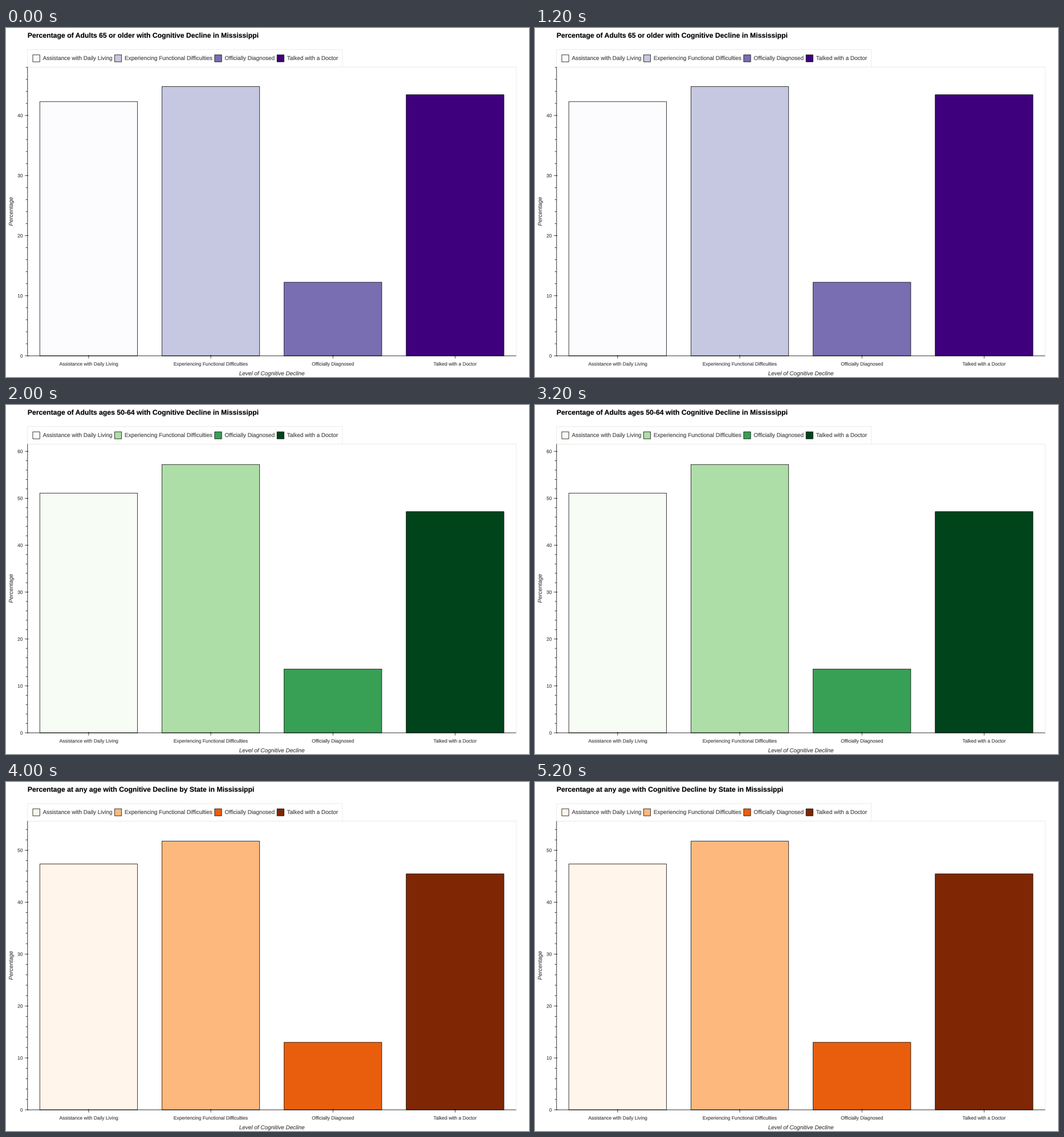
Animation, 917 px wide and 611 px high, one loop 6 s. Source, as a matplotlib script:

```python
import numpy as np
import matplotlib.pyplot as plt
from matplotlib.animation import FuncAnimation
from matplotlib.patches import PathPatch, Rectangle
from matplotlib.textpath import TextPath
from matplotlib.transforms import Affine2D

# The chart is laid out on a 1200 x 800 canvas and scaled to the stage.
STAGE_W, STAGE_H, DPI = 917, 611, 64
W, H = 1200, 800
PT = STAGE_W / W * 72 / DPI
LEFT, RIGHT, TOP, BOTTOM = 49.5, 1170.5, 89.5, 751.5
STEP = (RIGHT - LEFT) / 4
GREY, BORDER = "#444444", "#e5e5e5"

LEVELS = ["Assistance with Daily Living", "Experiencing Functional Difficulties",
          "Officially Diagnosed", "Talked with a Doctor"]
LEGEND_X = [59.5, 247.2, 476.8, 619.8]

CHARTS = [
    ("Percentage of Adults 65 or older with Cognitive Decline in Mississippi",
     "Purples", [42.3, 44.8, 12.25, 43.45]),
    ("Percentage of Adults ages 50-64 with Cognitive Decline in Mississippi",
     "Greens", [51.1, 57.2, 13.6, 47.15]),
    ("Percentage at any age with Cognitive Decline by State in Mississippi",
     "Oranges", [47.35, 51.75, 13.0, 45.45]),
]

fig = plt.figure(figsize=(STAGE_W / DPI, STAGE_H / DPI), dpi=DPI, facecolor="white")
ax = fig.add_axes([0, 0, 1, 1])


def line(x0, y0, x1, y1):
    ax.plot([x0, x1], [y0, y1], color="black", lw=PT, zorder=4,
            solid_capstyle="butt", snap=False)


def box(x0, y0, x1, y1, fill, edge="black", z=3):
    ax.add_patch(Rectangle((x0, y0), x1 - x0, y1 - y0, facecolor=fill,
                           edgecolor=edge, lw=PT, zorder=z, snap=False))


def label(x, y, text, size, color=GREY, ha="center", angle=0, **font):
    """Draw text as outlines with its baseline at y, free of pixel rounding."""
    path = TextPath((0, 0), text, size=size,
                    prop={"family": "Liberation Sans", **font})
    ink = path.get_extents()
    shift = {"left": 0, "center": (ink.x0 + ink.x1) / 2, "right": ink.x1}[ha]
    place = (Affine2D().translate(-shift, 0).rotate_deg(angle)
             .scale(1, -1).translate(x, y))
    ax.add_patch(PathPatch(place.transform_path(path), facecolor=color,
                           edgecolor=color, lw=0.2 * PT, zorder=5, snap=False))


def draw_legend(colors):
    box(LEFT, 49.5, 771.8, TOP, "white", BORDER, 2)
    for x, name, color in zip(LEGEND_X, LEVELS, colors):
        box(x + 2, 61.5, x + 18, 77.5, color)
        label(x + 25, 73.3, name, 13, ha="left")


def draw_axes(top, to_y):
    line(LEFT, TOP, LEFT, BOTTOM + 0.5)
    line(LEFT, BOTTOM, RIGHT, BOTTOM)
    for value in range(0, int(top) + 1, 2):
        y = to_y(value)
        if value % 10:
            line(LEFT - 4, y, LEFT, y)
        else:
            line(LEFT - 6, y, LEFT + 2, y)
            label(38.2, y + 4, str(value), 11, ha="right")
    for i, name in enumerate(LEVELS):
        x = LEFT + (i + 0.5) * STEP
        line(x, BOTTOM - 2, x, BOTTOM + 6)
        label(x, 773.8, name, 11)
    label((LEFT + RIGHT) / 2, 796.1, "Level of Cognitive Decline", 13, style="italic")
    label(15.7, (TOP + BOTTOM) / 2, "Percentage", 13, angle=90, style="italic")


def draw(i):
    title, cmap, values = CHARTS[i]
    colors = plt.get_cmap(cmap)(np.linspace(0, 1, 4))
    top = max(values) + 0.1 * (max(values) - min(values))

    def to_y(value):
        return BOTTOM - value / top * (BOTTOM - TOP)

    ax.clear()
    ax.set_xlim(0, W)
    ax.set_ylim(H, 0)
    ax.axis("off")
    box(LEFT, TOP, RIGHT, BOTTOM, "white", BORDER, 1)
    for k, (value, color) in enumerate(zip(values, colors)):
        x = LEFT + (k + 0.1) * STEP
        box(x, to_y(value), x + 0.8 * STEP, BOTTOM, color)
    draw_legend(colors)
    draw_axes(top, to_y)
    label(LEFT, 22.26, title, 16, "black", "left", weight="bold")
    return []


anim = FuncAnimation(fig, draw, frames=len(CHARTS), init_func=lambda: draw(0),
                     interval=2000, repeat=True)
plt.show()
```
